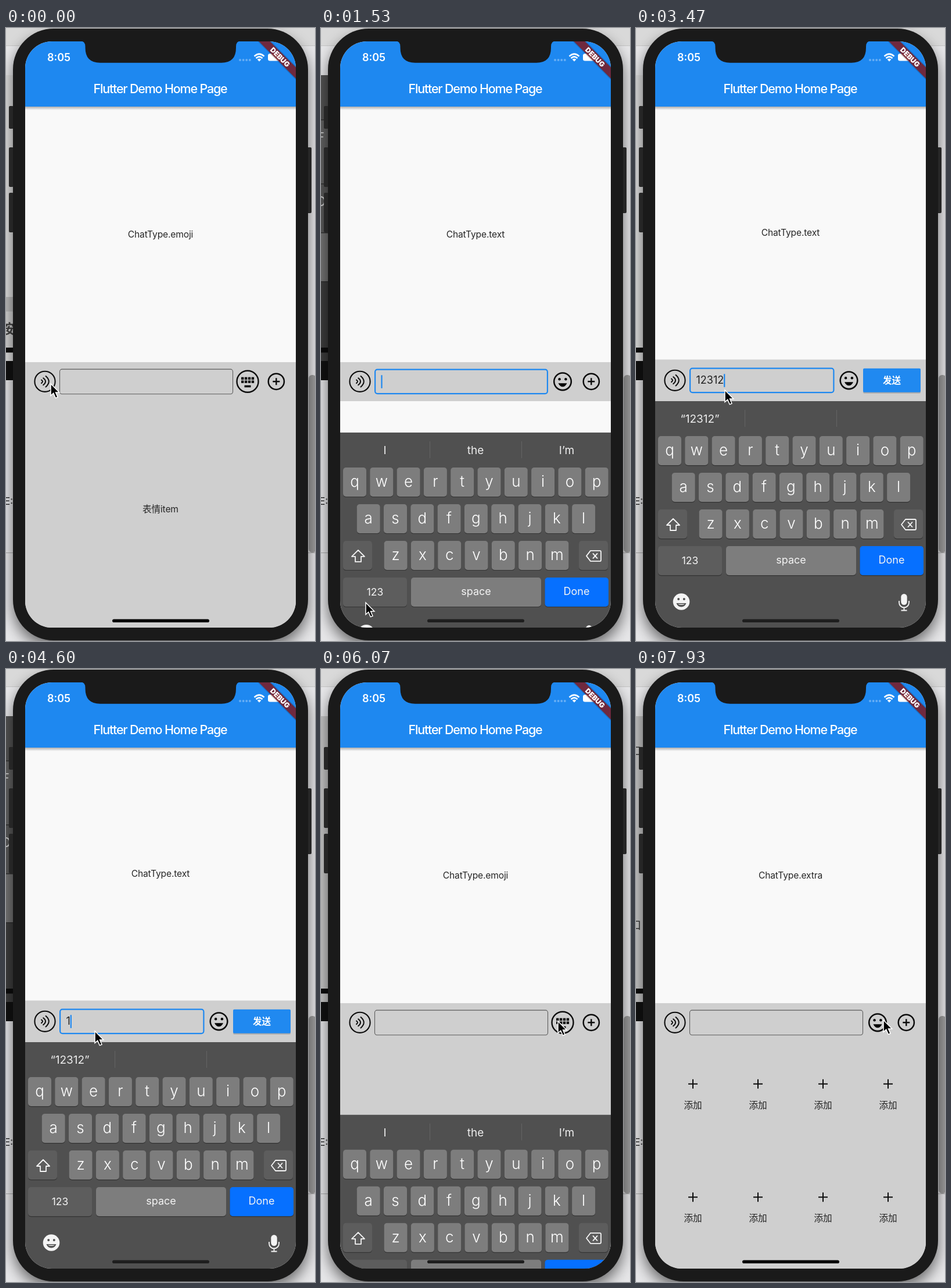
An HTML page that plays this animation: 532 px wide and 1053 px high, repeating every 8000 ms.

```html
<!DOCTYPE html>
<html lang="en">
<head>
<meta charset="utf-8">
<title>Chat input bar</title>
<style>
html, body { margin: 0; width: 100%; height: 100%; overflow: hidden; background: #e4e4e6; }
svg { display: block; width: 100%; height: 100%; }
text { font-family: Inter, "Noto Sans CJK SC", "Noto Sans CJK", sans-serif; text-anchor: middle; }
.left { text-anchor: start; }
.body { font-size: 15.6px; letter-spacing: -.15px; fill: #262626; }
.ink { fill: none; stroke: #0c0c0c; }
</style>
</head>
<body>
<svg id="stage" viewBox="0 0 532 1053"></svg>
<script>
const LOOP = 8000, PANEL = 389;

// --- markup helpers ---
const rect = (x, y, w, h, fill, more = '') =>
  `<rect x="${x}" y="${y}" width="${w}" height="${h}" fill="${fill}" ${more}/>`;
const text = (x, y, str, more = '') => `<text x="${x}" y="${y}" ${more}>${str}</text>`;
const path = (d, more = '') => `<path d="${d}" ${more}/>`;
const group = (id, inner, more = '') => `<g id="${id}" ${more}>${inner}</g>`;
const circle = (x, y, r, more = '') => `<circle cx="${x}" cy="${y}" r="${r}" ${more}/>`;
const clip = (id, inner) => `<clipPath id="${id}">${inner}</clipPath>`;

// --- page behind the phone ---
function backdrop() {
  const rows = [0, 92, 202, 286, 370].map((y, i) =>
    rect(0, y, 14, 507 - y, ['#525252', '#606060', '#575757', '#727272', '#3c3c3c'][i]) +
    rect(0, y, 14, 1.5, '#303030')).join('');
  return rect(0, 0, 532, 1053, '#e6e6e8') + rect(0, 0, 532, 30, '#d9d9d9') +
    rect(0, 30, 532, 1, '#c4c4c4') + rect(0, 81, 14, 491, '#dcdcdc', 'id="pageBase"') +
    group('pageVoice', rect(0, 462, 14, 25, '#bababa') + rect(0, 487, 14, 62, '#d0d0d0') +
      text(-9, 525, '按住', 'class="left" font-size="23" font-weight="700" fill="#444"')) +
    group('pageExtra', [148, 447].map(y =>
      text(-10, y, '口', 'class="left" font-size="19" font-weight="500" fill="#333"')).join('')) +
    `<g clip-path="url(#pageClip)">` + group('pageKeys', rows +
      text(-7, 130, 'F', 'class="left" font-size="22" fill="#ccc"') +
      text(-9, 241, 'O', 'class="left" font-size="23" fill="#ccc"')) + '</g>' +
    rect(0, 549, 14, 8.5, '#0c0c0c') + rect(0, 572, 14, 33, '#111') +
    text(-3, 819, 'E:', 'class="left" font-size="17" fill="#222"') +
    rect(0, 901, 532, 1, '#aaa') +
    rect(521, 596, 13, 305, '#9c9c9c', 'rx="6"');
}

function phone() {
  const button = (x, y, h) => rect(x, y, 8, h, '#262626', 'rx="2"');
  return rect(12, 13, 508, 1050, '#000', 'rx="70" opacity=".55" filter="url(#blur)"') +
    button(5, 134, 39) + button(5, 205, 68) + button(5, 283, 68) + button(518, 205, 113) +
    rect(12, 1, 508, 1051, '#1a1a1a', 'rx="70"');
}

// --- icons, centred on their own origin ---
const waves = circle(0, 0, 17.6, 'class="ink" stroke="#222" stroke-width="2.1"') +
  path('M-6-2.8Q-2 0-6 2.8M-2.8-6Q4.8 0-2.8 6M1.5-9.2Q12 0 1.5 9.2',
    'class="ink" stroke-width="2" stroke-linecap="round"');
const smiley = circle(0, 0, 14.8, 'class="ink" stroke-width="2.6"') +
  circle(-5.4, -4, 2.2) + circle(5.4, -4, 2.2) + path('M-7.5 3H7.5Q4.5 9 0 9T-7.5 3Z');
function keysIcon() {
  let s = circle(0, 0, 18.5, 'class="ink" stroke-width="2.4"') + rect(-5.5, 6.4, 11, 3.6, '#0c0c0c');
  for (let i = 0; i < 8; i++)
    s += rect(-11 + (i % 4) * 5.9, -7.6 + (i >> 2) * 5.8, 4.4, 4.4, '#0c0c0c');
  return s;
}
const at = (x, y, inner, id) => group(id, inner, `transform="translate(${x} ${y})"`);

function inputBar() {
  return rect(33, -33.5, 466, 67, '#cfcfcf', 'id="barFill"') +
    at(67, 0, waves, 'waves') + at(67, 0, keysIcon(), 'keysLeft') +
    rect(92.5, -21.2, 298, 42.6, 'none', 'id="field" rx="4"') +
    text(103.5, 5.6, '', 'id="typed" class="left" font-size="18" fill="#222"') +
    rect(103.4, -11, 2.2, 22.5, '#1e88f0', 'id="caret"') +
    text(241.5, 5.6, '按住说话', 'id="hold" class="body"') +
    at(416, 0, smiley, 'smiley') + at(416, 0, keysIcon(), 'keysRight') +
    at(465.3, 0, circle(0, 0, 13.6, 'class="ink" stroke-width="2.5"') +
      path('M-6 0H6M0-6V6', 'class="ink" stroke-width="2.4"'), 'plus') +
    group('send', rect(391, -18.5, 99, 41, '#000', 'rx="2" opacity=".18"') +
      rect(391, -20.5, 99, 41, '#2089f0', 'rx="2"') +
      text(440.5, 5.8, '发送', 'font-size="15.6" font-weight="700" fill="#fff"'));
}

function keyboard() {
  const key = (x, y, w, fill) => rect(x, y + 1.2, w, 50, '#343434', 'rx="5"') +
    rect(x, y, w, 50, fill, 'rx="5"');
  const label = (x, y, s, size) => text(x, y, s, `font-size="${size}" fill="#f4f4f4"`);
  let s = rect(33, 641, 466, 390, '#505050');
  s += [187, 345].map(x => rect(x, 656, 1, 29, '#646464')).join('');
  s += [110, 266, 423].map((x, i) => text(x, 678, '', `id="hint${i}" font-size="19" fill="#ededed"`)).join('');
  [['qwertyuiop', 38], ['asdfghjkl', 61.7], ['zxcvbnm', 108.6]].forEach(([row, x0], r) => {
    [...row].forEach((c, i) => {
      const x = x0 + i * 46.3, y = 701 + r * 63;
      s += key(x, y, 40, '#7d7d7d') +
        text(x + 20, y + 32.8, c, 'font-size="26" font-weight="300" fill="#fff"');
    });
  });
  s += key(38, 827, 50, '#5d5d5d') + key(444, 827, 50, '#5d5d5d') +
    key(38, 890, 110, '#5d5d5d') + key(155, 890, 224, '#7d7d7d') + key(385.5, 890, 109.5, '#0670ff');
  s += label(93, 921, '123', 17.5) + label(267, 920, 'space', 18) + label(440, 920, 'Done', 18);
  s += path('M64 843L75 854H69V863H59V854H53Z',
    'fill="none" stroke="#f4f4f4" stroke-width="1.8" stroke-linejoin="round"');
  s += path('M457 853L464 844H480Q482 844 482 846V860Q482 862 480 862H464ZM468 848.5L476 857.5M476 848.5L468 857.5',
    'fill="none" stroke="#f4f4f4" stroke-width="1.8" stroke-linejoin="round"');
  s += circle(78, 985.5, 14.3, 'fill="#f4f4f4"') + circle(73.2, 981, 2, 'fill="#505050"') +
    circle(82.8, 981, 2, 'fill="#505050"') +
    path('M69.5 988H86.5Q84 994.5 78 994.5T69.5 988Z', 'fill="#505050"') +
    path('M72 989.500H84Q82 991 78 991T72 989.500Z', 'fill="#f4f4f4"');
  s += rect(456.3, 972, 10.4, 19, '#f4f4f4', 'rx="5.2"') +
    path('M453 984V987A8.5 8.5 0 0 0 470 987V984M461.5 995.5V1000.5M456.5 1000.5H466.5',
      'fill="none" stroke="#f4f4f4" stroke-width="1.8"');
  return s;
}

function extras() {
  let s = '';
  for (let i = 0; i < 8; i++) {
    const x = 98 + (i % 4) * 112, y = 712.7 + (i >> 2) * 194.6;
    s += path(`M${x - 8} ${y}h16m-8-8v16`, 'class="ink" stroke-width="2"') +
      text(x, y + 42, '添加', 'class="body"');
  }
  return s;
}

function header() {
  let dots = '';
  for (let i = 0; i < 4; i++) dots += circle(403 + i * 5.6, 55, 2, 'fill="#fff" opacity=".32"');
  return rect(33, 135, 466, 6, 'url(#drop)') + rect(33, 23, 466, 112, '#1e88f0') +
    text(91, 57, '8:05', 'font-size="18" font-weight="600" fill="#fff"') + dots +
    path('M427.5 48.6Q436 40.6 444.5 48.6M430.5 52Q436 46.8 441.5 52',
      'fill="none" stroke="#fff" stroke-width="2.6"') + path('M432.6 54Q436 51 439.4 54L436 57.6Z', 'fill="#fff"') +
    rect(451, 44, 21, 12.5, '#fff', 'rx="3.5"') + rect(473, 48, 2, 5, '#fff', 'rx="1" opacity=".5"') +
    text(265.5, 112, 'Flutter Demo Home Page',
      'font-size="21.5" font-weight="500" letter-spacing="-1.2" fill="#fff"') +
    `<g transform="translate(499 23) rotate(45)">` +
    rect(-46, 30, 92, 16.5, '#000', 'opacity=".18"') + rect(-46, 31.5, 92, 13.5, '#7d1e28', 'opacity=".86"') +
    text(0, 42.6, 'DEBUG', 'font-size="12" font-weight="900" fill="#fff"') + '</g>';
}

const stage = document.getElementById('stage');
stage.innerHTML = '<defs>' +
  '<linearGradient id="drop" x2="0" y2="1"><stop stop-opacity=".3"/><stop offset="1" stop-opacity="0"/></linearGradient>' +
  '<filter id="blur" x="-20%" width="140%"><feGaussianBlur stdDeviation="12"/></filter>' +
  clip('screen', rect(33, 23, 466, 1007, '#000', 'rx="46"')) +
  clip('pageClip', rect(0, 81, 14, 491, '#000')) + '</defs>' +
  backdrop() + phone() +
  '<g clip-path="url(#screen)">' + rect(33, 23, 466, 1008, '#f9f9f9') +
  text(266, 0, '', 'id="label" class="body"') +
  rect(33, 0, 466, PANEL + 70, '#cfcfcf', 'id="panel"') +
  group('emojiPanel', text(266, 832, '表情item', 'class="body"')) + group('extraPanel', extras()) +
  group('bar', inputBar()) + group('keyboard', keyboard()) + header() +
  rect(183, 1015.5, 167, 5.6, '#0a0a0a', 'rx="2.8" id="home"') + '</g>' +
  path('M127 22Q136.5 22 136.5 32V34Q136.5 59.7 162 59.7H371Q396 59.7 396 34V32Q396 22 405 22Z', 'fill="#1a1a1a"') +
  group('pointer', path('M0 0V20.5L4.7 16.3L8.3 24.6L12 23L8.5 14.9H14.8Z',
    'fill="#000" stroke="#fff" stroke-width="1.5"'));

const el = {};
stage.querySelectorAll('[id]').forEach(n => el[n.id] = n);

// --- timeline ---
const MODES = [[0, 'emoji'], [100, 'voice'], [1270, 'text'], [5950, 'emoji'], [6950, 'extra']];
const INPUT = [[1690, ''], [2530, '1'], [2730, '12'], [2930, '123'], [3130, '1231'], [3370, '12312'],
  [4300, '1231'], [4400, '123'], [4500, '12'], [4600, '1'], [4730, '']];
const POINTER = [[600, 77, 611], [1150, 77, 987], [1750, 77, 987], [2250, 153, 622], [4950, 153, 622],
  [5530, 390, 561.5], [5780, 408, 605], [6480, 408, 605], [6850, 457, 605], [7700, 457, 605], [7930, 426, 603]];

const part = (t, start, len) => Math.min(1, Math.max(0, (t - start) / len));
const smooth = p => p * p * (3 - 2 * p);
const easeOut = (p, n = 3) => 1 - (1 - p) ** n;
const latest = (table, t) => table.reduce((hit, row) => t >= row[0] ? row : hit, table[0]);

function pointerAt(t) {
  const i = POINTER.findIndex(k => k[0] > t);
  if (i <= 0) return (i ? POINTER[POINTER.length - 1] : POINTER[0]).slice(1);
  const a = POINTER[i - 1], b = POINTER[i], p = smooth((t - a[0]) / (b[0] - a[0]));
  return [1, 2].map(k => a[k] + (b[k] - a[k]) * p);
}

function caretOpacity(t) {
  const age = t - latest(INPUT, t)[0] - 150;
  if (age < 500) return 1;
  const m = age % 1000;
  return m < 500 ? easeOut(part(m, 0, 250), 2) : 1 - easeOut(part(m, 500, 250), 1.3);
}

const show = (node, on) => node.setAttribute('display', on ? 'inline' : 'none');
const move = (node, x, y) => node.setAttribute('transform', `translate(${x} ${y})`);
const set = (node, attrs) => { for (const k in attrs) node.setAttribute(k, attrs[k]); };
const write = (node, s) => { if (node.textContent !== s) node.textContent = s; };

function drawPage(t) {
  const fall = t < 2400 ? 1 - easeOut(part(t, 1050, 330))
    : t < 3870 ? easeOut(part(t, 2400, 410), 2)
    : t < 5650 ? 1 - easeOut(part(t, 3950, 400)) : easeOut(part(t, 5650, 410), 2);
  move(el.pageKeys, 0, 65 + 507 * fall);
  show(el.pageVoice, t < 1050);
  show(el.pageExtra, t >= 6750);
  set(el.pageBase, { fill: t < 5650 ? '#dcdcdc' : '#c4c4c4' });
}

function draw(t) {
  const mode = latest(MODES, t)[1];
  const isText = mode === 'text', voice = mode === 'voice';
  const typed = isText ? latest(INPUT, t)[1] : '';
  const sending = typed !== '';
  const drop = smooth(part(t, 100, 290)) - smooth(part(t, 1270, 200));
  const top = (sending ? 569.5 : 574) + PANEL * drop;
  const mid = sending ? 605.3 : top + 33.3;

  drawPage(t);
  write(el.label, 'ChatType.' + mode);
  set(el.label, { y: (135 + top) / 2 + 5 });
  show(el.panel, !isText);
  set(el.panel, { y: top });
  show(el.emojiPanel, mode === 'emoji');
  show(el.extraPanel, mode === 'extra');

  move(el.bar, 0, mid);
  set(el.barFill, { y: top - mid, height: sending ? 71.5 : 67 });
  show(el.waves, !voice);
  show(el.keysLeft, voice);
  show(el.hold, voice);
  show(el.smiley, mode !== 'emoji');
  show(el.keysRight, mode === 'emoji');
  move(el.smiley, sending ? 366.5 : 416, 0);
  show(el.plus, !sending);
  show(el.send, sending);
  const inset = isText ? .6 : 0;
  set(el.field, {
    x: 92.5 + inset, y: inset - 21.2,
    width: (sending ? 248.5 : 298) - 2 * inset, height: 42.6 - 2 * inset,
    stroke: isText ? '#1e88f0' : '#5c5c5c',
    'stroke-width': isText ? 2.2 : 1.1
  });
  write(el.typed, typed);
  show(el.caret, isText);
  if (isText) set(el.caret, {
    x: 103.4 + (typed ? el.typed.getComputedTextLength() : 0),
    opacity: caretOpacity(t)
  });

  const hidden = t < 4000 ? 1 - easeOut(part(t, 1338, 400)) : smooth(part(t, 5950, 320));
  show(el.keyboard, hidden < 1);
  move(el.keyboard, 0, PANEL * hidden);
  set(el.home, { fill: hidden < .9 ? '#1e1e1e' : '#050505' });
  const guess = t > 2600 && t < 4730 ? latest(INPUT, Math.min(t - 70, 3600))[1] : '';
  (guess ? [`“${guess}”`, '', ''] : ['I', 'the', 'I’m']).forEach((s, i) => write(el['hint' + i], s));

  move(el.pointer, ...pointerAt(t));
}

const begin = performance.now();
function tick() {
  draw((performance.now() - begin) % LOOP);
  requestAnimationFrame(tick);
}
tick();
</script>
</body>
</html>
```
